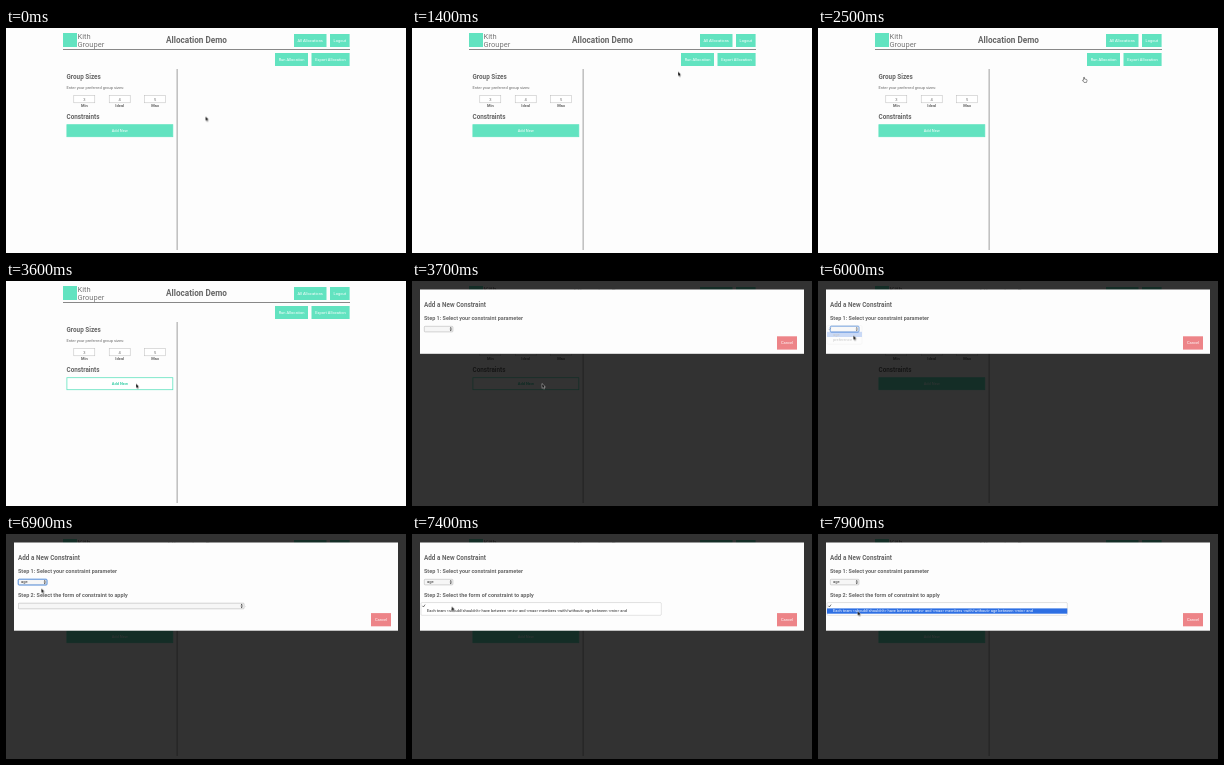
These frames come from a looping animation (400 by 225 pixels, 8000 ms). An HTML page:

```html
<!DOCTYPE html>
<html lang="en">
<head>
<meta charset="utf-8">
<title>Allocation Demo</title>
<style>
  :root { --teal: #62e3c0; --ink: #666; }
  html, body { margin: 0; width: 100%; height: 100%; overflow: hidden; background: #fdfdfd; }
  svg { display: block; width: 400px; height: 225px; }
  text { font: 4px Roboto, sans-serif; fill: var(--ink); }
  .mid { text-anchor: middle; }
  .bold { font-weight: 700; }
  .h1 { font-size: 8.2px; font-weight: 700; }
  .h2 { font-size: 6.35px; font-weight: 700; }
  .h3 { font-size: 5.46px; font-weight: 700; }
  .brand { font-size: 7.5px; fill: #777; }
  .teal { fill: var(--teal); }
  .on { fill: #fff; }
  .field { fill: #fff; stroke: #bbb; stroke-width: .5; }
  .select { fill: #f6f6f6; stroke: #aaa; stroke-width: .5; }
  .menu { fill: #fff; stroke: #bbb; stroke-width: .4; }
  .item { fill: #222; }
  .pick { fill: #2e6fe3; }

  /* every part shares the 8 s loop; stepped at 10 fps */
  .a { animation: 8s step-end infinite; }

  #cursor { animation-name: move; }
  @keyframes move {
    0% { transform: translate(199.5px, 88.3px); }
    1.25% { transform: translate(199.5px, 88.3px); animation-timing-function: steps(3, jump-start); }
    5%, 10% { transform: translate(258px, 52px); }
    10% { animation-timing-function: steps(4, jump-start); }
    15%, 16.25% { transform: translate(266px, 43.5px); }
    16.25% { animation-timing-function: steps(3, jump-start); }
    20%, 22.5% { transform: translate(266px, 49px); }
    22.5% { animation-timing-function: steps(8, jump-start); }
    32.5% { transform: translate(135.2px, 97.3px); animation-timing-function: steps(10, jump-start); }
    45%, 52.5% { transform: translate(130px, 102.5px); }
    52.5% { animation-timing-function: steps(7, jump-start); }
    61.25%, 66.25% { transform: translate(36.3px, 46px); }
    66.25% { animation-timing-function: steps(5, jump-start); }
    72.5%, 80% { transform: translate(35.3px, 54.3px); }
    80% { animation-timing-function: steps(6, jump-start); }
    87.5%, 93.75% { transform: translate(39.6px, 72.3px); }
    93.75% { animation-timing-function: steps(3, jump-start); }
    97.5%, 100% { transform: translate(39.6px, 77px); }
  }
  #arrow { animation-name: arrow; }
  #hand { animation-name: hand; }
  @keyframes arrow { 0%, 45% { opacity: 1; } 30% { opacity: 0; } 100% { opacity: 1; } }
  @keyframes hand { 0%, 45% { opacity: 0; } 30% { opacity: 1; } 100% { opacity: 0; } }

  #add { stroke: var(--teal); stroke-width: .8; animation-name: add; }
  @keyframes add {
    0%, 30% { fill: var(--teal); }
    30% { animation-timing-function: steps(6, jump-start); }
    37.5%, 47.5% { fill: #fff; }
    47.5% { animation-timing-function: steps(3, jump-start); }
    51.25%, 100% { fill: var(--teal); }
  }
  #label { animation-name: label; }
  @keyframes label {
    0%, 30% { fill: #fff; font-weight: 400; }
    30% { animation-timing-function: steps(3, jump-start); }
    33.75%, 47.5% { fill: #3ccfa8; font-weight: 700; }
    47.5% { animation-timing-function: steps(3, jump-start); }
    51.25%, 100% { fill: #fff; font-weight: 400; }
  }

  #dialog { animation-name: dialog; }
  @keyframes dialog { 0% { visibility: hidden; } 46.25%, 100% { visibility: visible; } }
  #panel { animation-name: grow; }
  @keyframes grow { 0% { height: 64.3px; } 76.25% { height: 82px; } 77.5%, 100% { height: 88.2px; } }
  #cancel { animation-name: drop; }
  @keyframes drop { 0% { transform: none; } 76.25% { transform: translateY(17.5px); } 77.5%, 100% { transform: translateY(23.8px); } }
  .chosen { animation-name: chosen; }
  @keyframes chosen { 0% { opacity: 0; } 76.25%, 100% { opacity: 1; } }
  #ring { fill: none; stroke: #4f8fe6; stroke-width: .9; animation-name: ring; }
  @keyframes ring { 0%, 92.5% { opacity: 0; } 62.5% { opacity: 1; } 100% { opacity: 0; } }

  #menu1 { animation-name: menu1; }
  @keyframes menu1 {
    0% { opacity: 0; } 62.5% { opacity: 1; } 73.75% { opacity: .6; }
    75% { opacity: .25; } 76.25%, 100% { opacity: 0; }
  }
  #pick1 { animation-name: pick1; }
  @keyframes pick1 { 0% { opacity: 0; } 68.75%, 100% { opacity: 1; } }
  #menu2 { animation-name: menu2; }
  @keyframes menu2 { 0% { opacity: 0; } 92.5%, 100% { opacity: 1; } }
  #pick2 { animation-name: pick2; }
  @keyframes pick2 { 0% { opacity: 0; } 96.25%, 100% { opacity: 1; } }
  #line2 { animation-name: line2; }
  @keyframes line2 { 0% { fill: #222; } 96.25%, 100% { fill: #fff; } }
</style>
</head>
<body>
<svg viewBox="0 0 400 225">
  <defs>
    <path id="updown" d="M-1.1 -.5L0 -2.2L1.1 -.5ZM-1.1 .5L0 2.2L1.1 .5Z" fill="#333"/>
    <path id="tick" d="M0 1.2L.9 2.4L2.6 0" fill="none" stroke="#222" stroke-width=".6"/>
  </defs>
  <rect width="400" height="225" fill="#fdfdfd"/>

  <rect class="teal" x="57" y="5" width="14" height="14"/>
  <text class="brand" x="71.5" y="11.3">Kith</text>
  <text class="brand" x="71.5" y="18.8">Grouper</text>
  <text class="h1 mid" x="190.5" y="15">Allocation Demo</text>
  <rect x="57" y="21" width="287" height="1" fill="#888"/>

  <g class="teal">
    <rect x="288" y="6" width="32.5" height="13"/>
    <rect x="324" y="6" width="19.6" height="13"/>
    <rect x="269" y="25" width="33" height="13"/>
    <rect x="305.5" y="25" width="38.1" height="13"/>
  </g>
  <text class="on mid" x="304.2" y="13.9">All Allocations</text>
  <text class="on mid" x="333.8" y="13.9">Logout</text>
  <text class="on mid" x="285.5" y="32.9">Run Allocation</text>
  <text class="on mid" x="324.5" y="32.9">Export Allocation</text>

  <rect x="170.7" y="41" width=".8" height="181" fill="#888"/>
  <text class="h2" x="60.5" y="51">Group Sizes</text>
  <text x="60.5" y="61">Enter your preferred group sizes:</text>
  <g class="field">
    <rect x="67.8" y="67.3" width="21" height="7.5"/>
    <rect x="103.2" y="67.3" width="21" height="7.5"/>
    <rect x="138.6" y="67.3" width="21" height="7.5"/>
  </g>
  <g class="mid">
    <text x="78.3" y="72.6">3</text>
    <text x="113.7" y="72.6">4</text>
    <text x="149.1" y="72.6">5</text>
    <text class="bold" x="78.3" y="79.4">Min</text>
    <text class="bold" x="113.7" y="79.4">Ideal</text>
    <text class="bold" x="149.1" y="79.4">Max</text>
  </g>
  <text class="h2" x="60.5" y="91.2">Constraints</text>
  <rect id="add" class="a" x="60.9" y="96.7" width="105.9" height="12"/>
  <text id="label" class="a mid" x="113.8" y="104.1">Add New</text>

  <g id="dialog" class="a">
    <rect width="400" height="225" fill="#000" opacity=".8"/>
    <rect id="panel" class="a" x="8" y="8.5" width="384" height="64.3" fill="#fdfdfd"/>
    <text class="h2" x="12" y="25.8">Add a New Constraint</text>
    <text class="h3" x="12" y="39">Step 1: Select your constraint parameter</text>
    <rect class="select" x="12.3" y="45.3" width="28.6" height="5.6" rx=".8"/>
    <use href="#updown" x="38.8" y="48.1"/>
    <text class="a chosen item" x="15" y="49.4">age</text>
    <rect id="ring" class="a" x="12.2" y="45.2" width="28.8" height="5.8" rx=".9"/>

    <g class="a chosen">
      <text class="h3" x="12" y="63">Step 2: Select the form of constraint to apply</text>
      <rect class="select" x="12.3" y="69.2" width="225.8" height="5.6" rx=".8"/>
      <use href="#updown" x="235.7" y="72"/>
      <text x="238.7" y="73.4">.</text>
    </g>
    <g id="cancel" class="a">
      <rect x="365" y="55.3" width="20" height="13.3" fill="#ed8488"/>
      <text class="on mid" x="375" y="63.4">Cancel</text>
    </g>

    <g id="menu1" class="a">
      <rect class="menu" x="9" y="44.6" width="35" height="18.6" rx="1"/>
      <use href="#tick" x="10.5" y="46.6"/>
      <rect id="pick1" class="a pick" x="9" y="50.8" width="35" height="5.2"/>
      <text class="item" x="15" y="54.8">age</text>
      <text class="item" x="15" y="60.2">preference</text>
    </g>
    <g id="menu2" class="a">
      <rect class="menu" x="9" y="68.6" width="240.3" height="12.7" rx="1"/>
      <use href="#tick" x="10.5" y="70.6"/>
      <rect id="pick2" class="a pick" x="9" y="74.4" width="240.3" height="5.3"/>
      <text id="line2" class="a" x="15" y="78.4">Each team &lt;should/shouldn't&gt; have between &lt;min&gt; and &lt;max&gt; members &lt;with/without&gt; age between &lt;min&gt; and</text>
    </g>
  </g>

  <g id="cursor" class="a" stroke="#fff" stroke-width=".4">
    <path id="arrow" class="a" d="M0 0V4.7L1.1 3.7L1.8 5.4L2.7 5L2 3.4H3.4Z" fill="#000"/>
    <path id="hand" class="a" d="M-.4 .4Q0 -.3 .5 .4V2L2.4 2.4Q3.1 2.6 3 3.5L2.5 5.4H0L-1.5 3.4Q-1.4 2.6 -.4 3.2Z" fill="#fff" stroke="#222" stroke-width=".5"/>
  </g>
</svg>
</body>
</html>
```
